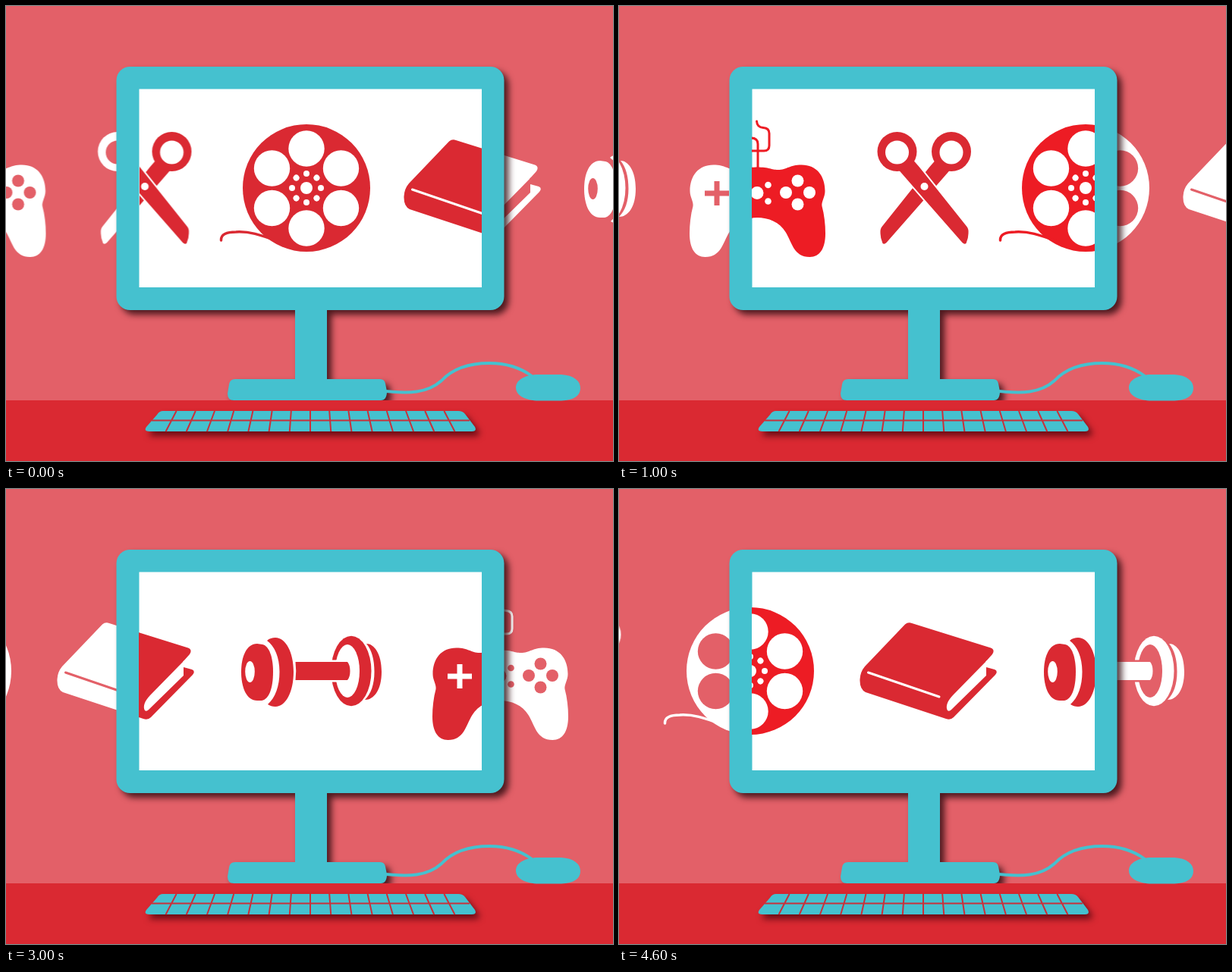
An HTML page for the animation above (5 s loop, 800x600 px).

```html
<!DOCTYPE html>
<html lang="en">
<head>
<meta charset="utf-8">
<title>Desktop computer with passing icons</title>
<style>
  :root { --back: #e36068; --red: #da2932; --bright: #ed1c24; --teal: #45c1cf; }
  html, body { margin: 0; width: 100%; height: 100%; overflow: hidden; background: var(--back); }
  svg { display: block; width: 100vw; height: 100vh; }

  /* Icons use the current colour; --hole fills their cut-outs. */
  .outside { color: #fff; --hole: var(--back); }
  .inside { color: var(--red); --hole: #fff; }
  .icon { fill: currentColor; }
  .hole { fill: var(--hole); }
  .line { fill: none; stroke: currentColor; stroke-linecap: round; stroke-linejoin: round; }
  .gap { stroke: var(--hole); paint-order: stroke; }

  #row use { animation: pass 5s step-end infinite; }
  .reel     { --a: 0px;      --b: 219px;  --c: 437px;  --d: -473px; --e: -223px; }
  .scissors { --a: -219.5px; --b: 0px;    --c: 218px;  --d: 600px;  --e: -461.5px; }
  .gamepad  { --a: -437.5px; --b: -218px; --c: 0px;    --d: 251px;  --e: 600px; }
  .dumbbell { --a: 452px;    --b: -473px; --c: -255px; --d: 0px;    --e: 250px; }
  .book     { --a: 207px;    --b: 426px;  --c: -700px; --d: -250px; --e: 0px; }
  @keyframes pass {
    0%   { transform: translateX(var(--a)); }
    20%  { transform: translateX(var(--b)); }
    40%  { transform: translateX(var(--c)); }
    60%  { transform: translateX(var(--d)); }
    80%, 100% { transform: translateX(var(--e)); }
  }

  .inside { animation: tint 5s step-end infinite; }
  @keyframes tint {
    0%   { --reel: var(--red); --pad: var(--red); }
    20%  { --reel: var(--bright); --pad: var(--bright); }
    40%  { --reel: var(--red); --pad: var(--red); }
    80%, 100% { --reel: var(--bright); --pad: var(--red); }
  }
  .inside .reel { color: var(--reel); }
  .inside .gamepad { color: var(--pad); }

  .monitor { fill: var(--teal); filter: drop-shadow(6px 6px 4px rgba(40, 8, 12, .8)); }
  .keyboard { filter: drop-shadow(5px 6px 4px rgba(60, 0, 8, .7)); }
</style>
</head>
<body>
<svg viewBox="0 0 800 600" preserveAspectRatio="none">
  <defs>
    <clipPath id="screen"><rect x="175.5" y="109.5" width="451.5" height="261.5"/></clipPath>

    <g id="reel" class="icon">
      <circle cx="396" cy="240" r="84"/>
      <path class="line" stroke-width="3.5" d="M283.5 309C283 301 291 298 303 298C320 297 334 301 360 311"/>
      <g class="hole" transform="translate(396 240)">
        <circle cy="-52" r="23.7"/><circle cy="53" r="23.7"/>
        <circle cx="-45.5" cy="-26" r="23.7"/><circle cx="45.5" cy="-26" r="23.7"/>
        <circle cx="-45.5" cy="26.5" r="23.7"/><circle cx="45.5" cy="26.5" r="23.7"/>
        <circle r="8"/>
        <g id="dots"><circle cx="19" r="4"/><circle cx="-19" r="4"/><circle cy="19" r="4"/><circle cy="-19" r="4"/></g>
        <use href="#dots" transform="rotate(45)" style="animation:none"/>
      </g>
    </g>

    <path id="blade" d="M-35 216L-7 247L50 312Q53 315 55 313Q58 306 58 300Q58.500 294 56 291L-7 212L-14 204Z"/>
    <g id="scissors" class="icon">
      <g transform="translate(402.5 0)">
        <path d="M34 216L7 247L-50 312Q-53 315 -55 313Q-58 306 -58 300Q-58.500 294 -56 291L7 212L14 204Z"/>
        <path class="gap" stroke-width="4" d="M-34 216L-7 247L50 312Q53 315 55 313Q58 306 58 300Q58.500 294 56 291L-7 212L-14 204Z"/>
        <circle cx="-36" cy="192" r="26"/><circle cx="35.500" cy="192" r="26"/>
        <g class="hole"><circle cx="-36" cy="193" r="15.500"/><circle cx="35.500" cy="193" r="15.500"/><circle cy="238" r="5"/></g>
      </g>
    </g>

    <path id="half" d="M1 212.500C-16 212.500 -18 216 -27 216C-39 216 -42 209.500 -58 209.500C-78 209.500 -89 224 -89 244C-89 252 -84 258 -85 264C-88 275 -89.500 288 -89.500 300C-89.500 320 -82 331 -69 331C-48 331 -46 313 -37 298C-29 285 -15 279 1 279Z"/>
    <g id="gamepad" class="icon">
      <path class="line" stroke-width="3" d="M401 214V182Q401 174 392 174Q382.500 174 382.500 183Q382.500 191 392 191H409Q416 191 416 184V168Q416 161 408 160.500Q400 160 399.500 152"/>
      <g transform="translate(400.5 0)">
        <use href="#half" style="animation:none"/>
        <use href="#half" transform="scale(-1 1)" style="animation:none"/>
      </g>
      <g class="hole">
        <path d="M343.500 231H350.500V243.500H363V250.500H350.500V263H343.500V250.500H331V243.500H343.500Z"/>
        <circle cx="400" cy="246.500" r="8.500"/>
        <circle cx="385" cy="236" r="4.300"/><circle cx="414.500" cy="236" r="4.300"/>
        <circle cx="385" cy="257.500" r="4.300"/><circle cx="414.500" cy="257.500" r="4.300"/>
        <circle cx="453.500" cy="230.500" r="8"/><circle cx="453.500" cy="261.500" r="8"/>
        <circle cx="438" cy="246" r="8"/><circle cx="469" cy="246" r="8"/>
      </g>
    </g>

    <g id="dumbbell" class="icon">
      <path d="M331 204C317 204 310 221 310 241C310 262 317 279 331 279H337C347 277 352 262 352 241C352 222 347 207 338 205Z"/>
      <ellipse class="hole" cx="321.500" cy="241" rx="6.300" ry="14"/>
      <path d="M344 200C347 197 351 196 355 196C369 196 379 216 379 241C379 267 369 287 355 287C351 287 348 286 345 284C355 275 360.500 260 360.500 241C360.500 222 354 207 344 200Z"/>
      <ellipse cx="455" cy="240" rx="26.500" ry="46.300"/>
      <ellipse class="hole" cx="450" cy="240" rx="16" ry="35"/>
      <path class="gap" stroke-width="5" d="M381.500 228H450Q453.500 232 453.500 240T450 252H381.500Q383 240 381.500 228Z"/>
      <path d="M475 204C485 204 495 217 495 241C495 265 485 278 473 278C481 270 485.500 258 485.500 241C485.500 225 482 212 475 204Z"/>
    </g>

    <g id="book" class="icon">
      <path d="M377 178.500Q381 175 386 177L490 209.500Q496 212 492 218L483 228L484 235L495 238Q500 240 496 245L441 301Q437 305 431 303L325 268Q317 264 317.500 251Q318 241 324 234Z"/>
      <path class="hole" d="M485 226L440 272C433 279 430 287 433 292Q435 294 438 291L484 246V234.500L487 232Z"/>
      <path class="line" style="stroke:var(--hole)" stroke-width="3" d="M328.500 242L422 274"/>
    </g>
  </defs>

  <rect width="800" height="600" fill="var(--back)"/>

  <g id="row">
    <g class="outside">
      <use href="#reel" class="reel"/>
      <use href="#scissors" class="scissors"/>
      <use href="#gamepad" class="gamepad"/>
      <use href="#dumbbell" class="dumbbell"/>
      <use href="#book" class="book"/>
    </g>

    <g class="monitor">
      <rect x="145.500" y="80" width="511" height="321" rx="18"/>
      <path d="M381 395H423V492H493Q499 492 500 498L502 508Q502 520 494 520H300Q292 520 292 511L294 499Q295 492 302 492H381Z"/>
      <rect x="175.500" y="109.500" width="451.500" height="261.500" fill="#fff"/>
    </g>

    <g class="inside" clip-path="url(#screen)">
      <use href="#reel" class="reel"/>
      <use href="#scissors" class="scissors"/>
      <use href="#gamepad" class="gamepad"/>
      <use href="#dumbbell" class="dumbbell"/>
      <use href="#book" class="book"/>
    </g>
  </g>

  <rect y="520" width="800" height="80" fill="var(--red)"/>

  <path d="M501 508C530 511 555 511 574 494C588 479 610 471 637 471C660 471 678 477 693 488" fill="none" stroke="var(--teal)" stroke-width="4"/>
  <path d="M699 486H732C748 487 757 494 757 504C757 514 748 520 732 520.500H699C682 519 672 513 672 503C672 494 682 487 699 486Z" fill="var(--teal)"/>

  <g class="keyboard">
    <path d="M207 534H596Q602 534 605 538L618 555Q621 561 614 561H189Q181 561 185 555L199 539Q202 534 207 534Z" fill="var(--teal)"/>
    <path id="keys" fill="none" stroke="#c9303a" stroke-width="2"/>
  </g>
</svg>
<script>
  // Key gaps fan out from the middle of the keyboard.
  let gaps = 'M192 546.5H611';
  for (let k = -7; k <= 7; k++) gaps += `M${401 + 25.2 * k} 534L${401 + 27.2 * k} 561`;
  document.getElementById('keys').setAttribute('d', gaps);
</script>
</body>
</html>
```
